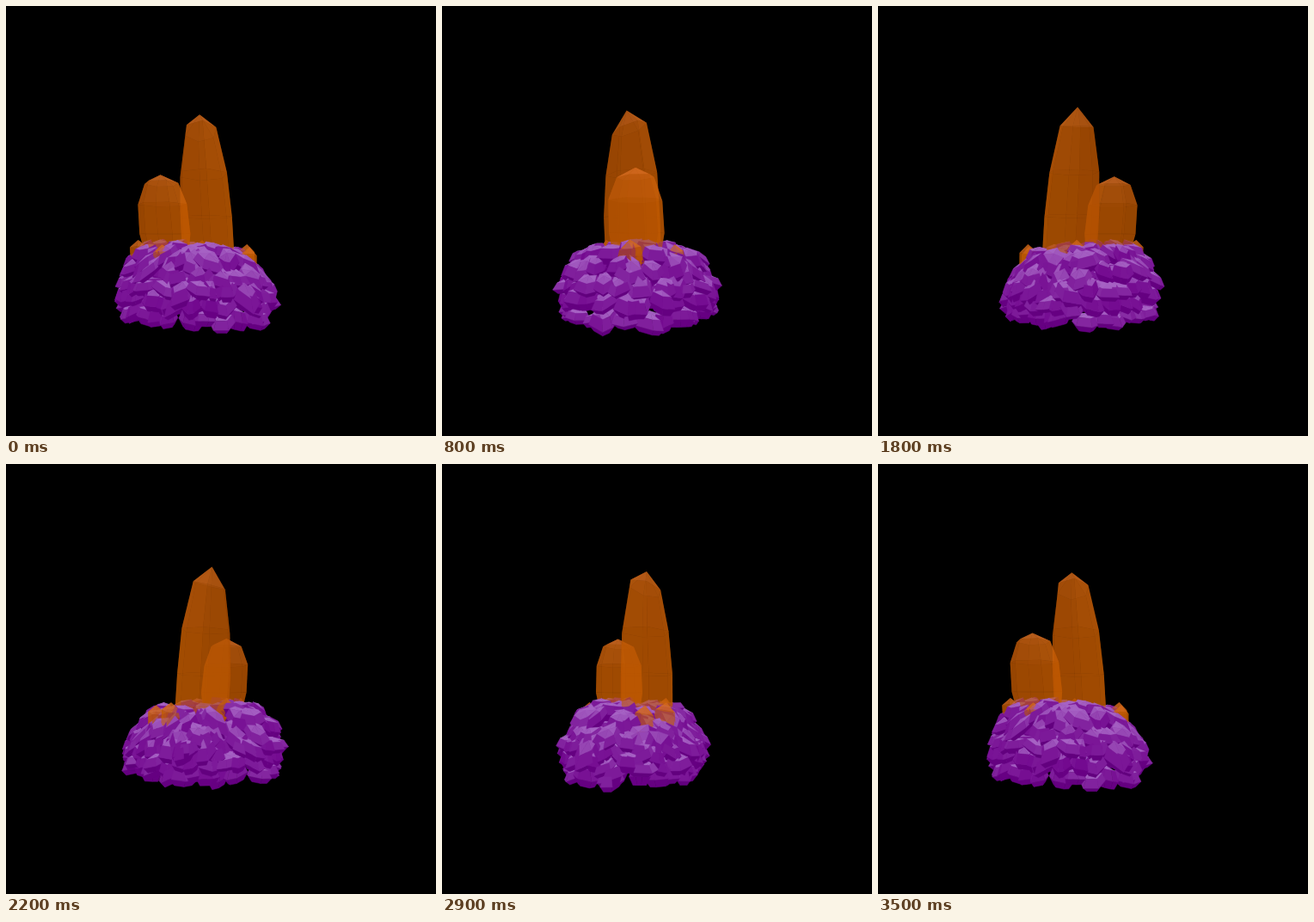
These frames come from a looping animation (500x500 px, 3.6 s). An HTML page with a canvas:

```html
<!DOCTYPE html>
<html>
<head>
<meta charset="utf-8">
<title>Crystal cluster</title>
<style>
html, body { margin: 0; width: 100%; height: 100%; overflow: hidden; background: #000; }
canvas { display: block; }
</style>
</head>
<body>
<canvas id="stage" width="500" height="500"></canvas>
<script>
const ctx = document.getElementById('stage').getContext('2d');
const TAU = Math.PI * 2, CAMERA = 450, AXIS_X = 228, HORIZON = 275;
const faces = [];

let seed = 11;
function rnd(a, b) {
  seed = (seed * 16807) % 2147483647;
  return a + (b - a) * seed / 2147483647;
}
const clamp = v => Math.max(0, Math.min(1, v));
const sub = (a, b) => a.map((v, i) => v - b[i]);
const dot = (a, b) => a[0] * b[0] + a[1] * b[1] + a[2] * b[2];
const mean = pts => [0, 1, 2].map(i => pts.reduce((s, p) => s + p[i], 0) / pts.length);

// Joins rings of [x, height, z] points, listed from top to bottom, with flat faces.
function addSolid(rings, rock) {
  const middle = mean(rings.flat()), n = rings[0].length;
  for (let r = 0; r + 1 < rings.length; r++) {
    for (let j = 0; j < n; j++) {
      const k = (j + 1) % n;
      const pts = [rings[r][j], rings[r][k], rings[r + 1][k], rings[r + 1][j]];
      const a = sub(pts[2], pts[0]), b = sub(pts[3], pts[1]), center = mean(pts);
      let normal = [a[1] * b[2] - a[2] * b[1], a[2] * b[0] - a[0] * b[2], a[0] * b[1] - a[1] * b[0]];
      const size = Math.hypot(...normal) || 1;
      const sign = dot(normal, sub(center, middle)) < 0 ? -1 : 1;
      normal = normal.map(v => v * sign / size);
      faces.push({ pts, center, normal, rock, color: rock ? rockColor(normal) : crystalColor(normal) });
    }
  }
}

function rockColor(n) {
  const lit = clamp((n[1] - 0.12) / 0.78), under = clamp(-n[1]) * 18;
  return `rgb(${110 + 56 * lit - under},${98 * lit},${138 + 58 * lit - under})`;
}

function crystalColor(n) {
  const up = clamp(n[1] - 0.1), side = 7 * n[0] + 5 * n[2];
  return `rgba(${186 + side + 40 * up},${86 + side * 0.6 + 30 * up},${2 + 40 * up},0.6)`;
}

// Each ring is [x, z, height, radius, tilt towards z].
function addCrystal(rings, turn, n = 6) {
  addSolid(rings.map(([x, z, h, r, tilt = 0]) =>
    Array.from({ length: n }, (_, j) => {
      const a = turn + j * TAU / n;
      return [x + r * Math.cos(a), h + tilt * Math.sin(a), z + r * Math.sin(a)];
    })), false);
}

function addShard(x, z, top, base, r, lean) {
  const d = Math.hypot(x, z), u = x / d * lean, v = z / d * lean;
  addCrystal([
    [x + u, z + v, top, 0],
    [x + u * 0.6, z + v * 0.6, top - 9, r * 0.85, 2],
    [x, z, (top + base) / 2 - 3, r],
    [x - u, z - v, base, r * 0.8]
  ], rnd(0, 1), 5);
}

const spread = [84, 88, 101, 95, 85, 97, 103, 101, 93, 95, 72, 78];
function rockRadius(angle) {
  const p = ((angle / TAU * 12) % 12 + 12) % 12, i = Math.floor(p);
  return spread[i] + (spread[(i + 1) % 12] - spread[i]) * (p - i);
}

function addChunk(angle, part, height, slope) {
  const d = rockRadius(angle) * part, c = Math.cos(angle), s = Math.sin(angle);
  const x = d * c, z = d * s, r = rnd(11, 17), thick = rnd(6, 10), n = 6;
  const h = height + rnd(-3, 3) - 0.12 * x * clamp((height + 75) / 50);
  const tiltX = rnd(-0.35, 0.35), tiltZ = rnd(-0.35, 0.35);
  const wobble = Array.from({ length: n }, (_, j) => [j * TAU / n + rnd(-0.3, 0.3), r * rnd(0.75, 1.1)]);
  const ring = (scale, lift) => wobble.map(([a, w]) => {
    const dx = scale * w * Math.cos(a), dz = scale * w * Math.sin(a);
    return [x + dx, h + lift - slope * (dx * c + dz * s) + tiltX * dx + tiltZ * dz, z + dz];
  });
  addSolid([ring(0, thick + 1), ring(0.72, thick * 0.8), ring(1, -thick * 0.2), ring(0.65, -thick), ring(0, -thick)], true);
}

// Rock layers: share of the radius, height, number of chunks, outward slope.
[
  [0.02, -13, 1, 0], [0.28, -12, 8, 0.1], [0.5, -13, 16, 0.25], [0.68, -20, 22, 0.5],
  [0.79, -33, 27, 0.6], [0.86, -47, 30, 0.5], [0.87, -60, 30, 0.35], [0.82, -74, 28, 0.15],
  [0.5, -40, 10, 0], [0.5, -65, 12, 0], [0.68, -52, 18, 0.2]
].forEach(([part, height, count, slope]) => {
  for (let i = 0; i < count; i++) {
    addChunk((i + rnd(-0.4, 0.4)) * TAU / count, part + rnd(-0.03, 0.03), height, slope);
  }
});

addCrystal([
  [-3, -13, 153, 0], [-2, -10, 132, 20, 7], [1, -8, 80, 30, 2],
  [4, -8, 30, 33], [6, -7, -5, 33], [7, -6, -24, 30]
], 0.4);
addCrystal([
  [-48, 4, 78, 0], [-47, 4, 68, 20, 1], [-46, 4, 44, 29],
  [-43, 5, 10, 30], [-40, 5, -18, 25]
], 0.15);
addShard(50, 18, -5, -42, 12, 3);
addShard(50, -6, -2, -40, 13, 3);
addShard(-70, 2, 3, -24, 13, 4);
addShard(-40, 42, -2, -20, 12, 3);
addShard(0, -36, 3, -20, 11, 2);

function draw(angle) {
  const c = Math.cos(angle), s = Math.sin(angle);
  const depth = p => p[2] * c - p[0] * s;
  const eye = [-CAMERA * s, 0, CAMERA * c];
  ctx.fillStyle = '#000';
  ctx.fillRect(0, 0, 500, 500);
  faces
    .filter(f => !f.rock || dot(f.normal, sub(eye, f.center)) > 0)
    .map(f => [depth(f.center), f])
    .sort((a, b) => a[0] - b[0])
    .forEach(([, f]) => {
      ctx.beginPath();
      for (const p of f.pts) {
        const scale = CAMERA / (CAMERA - depth(p));
        ctx.lineTo(AXIS_X + (p[0] * c + p[2] * s) * scale, HORIZON - p[1] * scale);
      }
      ctx.closePath();
      ctx.fillStyle = f.color;
      ctx.fill();
      if (f.rock) {
        ctx.strokeStyle = f.color;
        ctx.lineWidth = 0.5;
        ctx.stroke();
      }
    });
}

let shown = -1;
function tick() {
  const step = Math.floor(performance.now() % 3600 / 100);
  if (step !== shown) draw((shown = step) * 10.25 * Math.PI / 180);
  requestAnimationFrame(tick);
}
tick();
</script>
</body>
</html>
```
